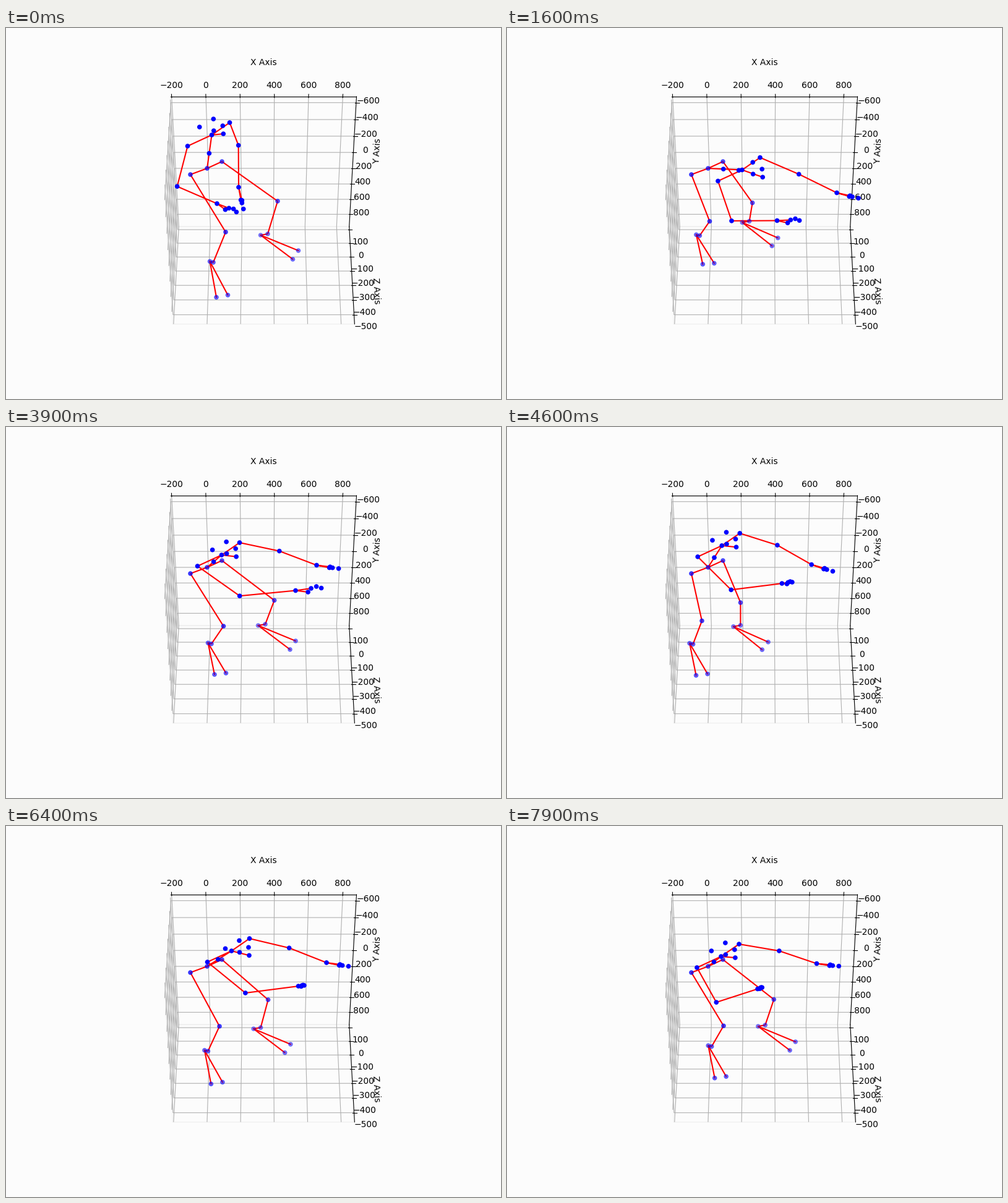
These frames come from a looping animation (800 px wide and 600 px high, 8000 ms). A matplotlib script:

```python
import numpy as np
import matplotlib.pyplot as plt
from matplotlib.animation import FuncAnimation

BG = "#fcfcfc"
FRAMES, STEP = 80, 100

fig = plt.figure(figsize=(8, 6), dpi=100, facecolor=BG)

# Static 3D box, seen from below; the tiny turn keeps the back pane on the left
box = fig.add_subplot(111, projection="3d", facecolor=BG)
box.view_init(elev=-45, azim=-89.999999)
box.set(xlim=(-206, 880), ylim=(-671, 967), zlim=(-562, 122.5),
        xlabel="X Axis", ylabel="Y Axis", zlabel="Z Axis")
box.set_xticks(range(-200, 801, 200))
box.set_yticks(range(-600, 801, 200))
box.set_zticks(range(-500, 101, 100))
for axis in (box.xaxis, box.yaxis, box.zaxis):
    axis.pane.fill = False

# Flat layer in screen pixels; points are complex numbers x + y*1j
view = fig.add_axes([0, 0, 1, 1], facecolor="none")
view.set(xlim=(0, 800), ylim=(600, 0))
view.axis("off")

PELVIS = 325 + 227j
HEAD = dict(ear_l=9 - 20j, eye_l=24 - 9j, ear_r=-13.5 - 7j,
            eye_r=9.5 - 1j, nose=25 + 4j)

# chest, left wrist, right wrist, crouch, sink of the feet, opening of the right hand
POSES = dict(
    start=(332.5 + 173j, 376 + 257.5j, 341 + 284j, 1, 16, .9),
    bend=(380 + 229.5j, 533 + 266.5j, 436.5 + 311.5j, .45, -4.5, .95),
    stretch=(341.5 + 188.5j, 483.5 + 223j, 435 + 251j, 0, 2, .5),
    rise=(348.5 + 207j, 502 + 223.5j, 468 + 264.5j, .93, 2, 1.1),
    reach=(364.5 + 203j, 511 + 242j, 485.5 + 273.5j, .27, -.5, 1.1),
    crouch=(364.5 + 202j, 518 + 221j, 472.5 + 259j, .8, 9, .25),
    pull=(346 + 211j, 500.5 + 222.5j, 405 + 263.5j, .9, 5, .2),
)

TIMELINE = {0: "start", 600: "crouch", 1000: "stretch", 1600: "bend",
            2100: "rise", 2550: "crouch", 2800: "stretch", 3350: "reach",
            3900: "rise", 4400: "crouch", 4700: "stretch", 5400: "reach",
            5900: "pull", 6400: "crouch", 6650: "stretch", 7200: "reach",
            7900: "pull"}
TIMES = list(TIMELINE)
KEYS = [np.array(POSES[name]) for name in TIMELINE.values()]

FADE = dict(pelvis=.65, hip=.62, knee=.6, ankle=.46, heel=.42, toe=.45, side=.47,
            elbow=.92)

CHAINS = ["pelvis spine chest nose"]
for s in "lr":
    CHAINS += [f"chest shoulder_{s} elbow_{s} wrist_{s} thumb_{s}",
               f"wrist_{s} index_{s}",
               f"pelvis hip_{s} knee_{s} ankle_{s} heel_{s} toe_{s}",
               f"heel_{s} side_{s}"]


def hand(p, side, offsets, turn=1):
    """Fingers follow the direction of the forearm."""
    wrist = p["wrist_" + side]
    arm = wrist - p["elbow_" + side]
    for name, d in zip(("thumb", "index", "pinky", "tip"), offsets):
        p[f"{name}_{side}"] = wrist + d * turn * arm / abs(arm)


def foot(p, side, heel, toe, outer):
    p["heel_" + side] = p["ankle_" + side] + heel
    p["toe_" + side] = p["heel_" + side] + toe
    p["side_" + side] = p["heel_" + side] + outer


def skeleton(chest, wrist_l, wrist_r, crouch, sink, grip):
    k, drop, grip = crouch.real, sink.real * 1j, grip.real
    lean = chest - PELVIS
    p = dict(pelvis=PELVIS, spine=PELVIS + .45 * lean, chest=chest)

    nod = (lean.real / 28 - 1) * (8.5 + 8j)
    for name, d in HEAD.items():
        p[name] = chest + d + nod

    # The left arm is nearly straight, the right elbow hangs below
    p["shoulder_l"], p["wrist_l"] = chest + 29 - 20j, wrist_l
    arm = wrist_l - p["shoulder_l"]
    p["elbow_l"] = p["shoulder_l"] + arm / 2 + (140 - abs(arm)) * (.2 - .45j)
    hand(p, "l", (22, 21 + 1.5j, 26 + 1j, 36 + 1j), np.exp(-.24j))

    p["shoulder_r"], p["wrist_r"] = chest - 39 + 18j, wrist_r
    arm = wrist_r - p["shoulder_r"]
    sag = 62 - .2 * abs(arm)
    p["elbow_r"] = p["shoulder_r"] + arm / 2 + 1j * sag * arm / abs(arm) - 4
    hand(p, "r", grip * np.array([23 - 1j, 18 + 4j, 31 - 3j, 38]))

    p["hip_l"] = 349 + 216j
    p["knee_l"] = 362 + 285j + k * (77 - 5j)
    p["ankle_l"] = 366 + 317j + k * 57 + drop
    foot(p, "l", -11.5 + 2j, 55 + 25j + 6 * k, 45 + 37j + k * (7 + 2j))

    p["hip_r"] = 298 + 237j
    p["knee_r"] = 305 + 309j + k * (50 + 13j) + .5 * drop
    p["ankle_r"] = 292 + 343j + k * (43 + 4j) + 2 * drop
    foot(p, "r", -5.5 - 1.5j, 29 + 48j + .4 * drop, 10.5 + 50j + .5 * drop)
    return p


def pose_at(t):
    i = min(np.searchsorted(TIMES, t, side="right") - 1, len(TIMES) - 2)
    u = (t - TIMES[i]) / (TIMES[i + 1] - TIMES[i])
    u = (1 - np.cos(np.pi * u)) / 2
    return skeleton(*(KEYS[i] * (1 - u) + KEYS[i + 1] * u))


def shade(name):
    part = name.split("_")[0]
    return min(1, FADE.get(part, 1) + .08 * name.endswith("_r"))


colors = [(0, 0, 1, shade(name)) for name in pose_at(0)]
bones, = view.plot([], [], color="red", lw=1.5, zorder=2)
dots = view.scatter([0] * len(colors), [0] * len(colors), s=20, c=colors, zorder=3)


def draw(frame):
    p = pose_at(frame * STEP)
    pts = np.array(list(p.values()))
    dots.set_offsets(np.column_stack([pts.real, pts.imag]))
    path = []
    for chain in CHAINS:
        path += [p[name] for name in chain.split()] + [complex(np.nan, np.nan)]
    bones.set_data(np.real(path), np.imag(path))
    return bones, dots


anim = FuncAnimation(fig, draw, frames=FRAMES, interval=STEP, repeat=True,
                     repeat_delay=0, cache_frame_data=False)
plt.show()
```
